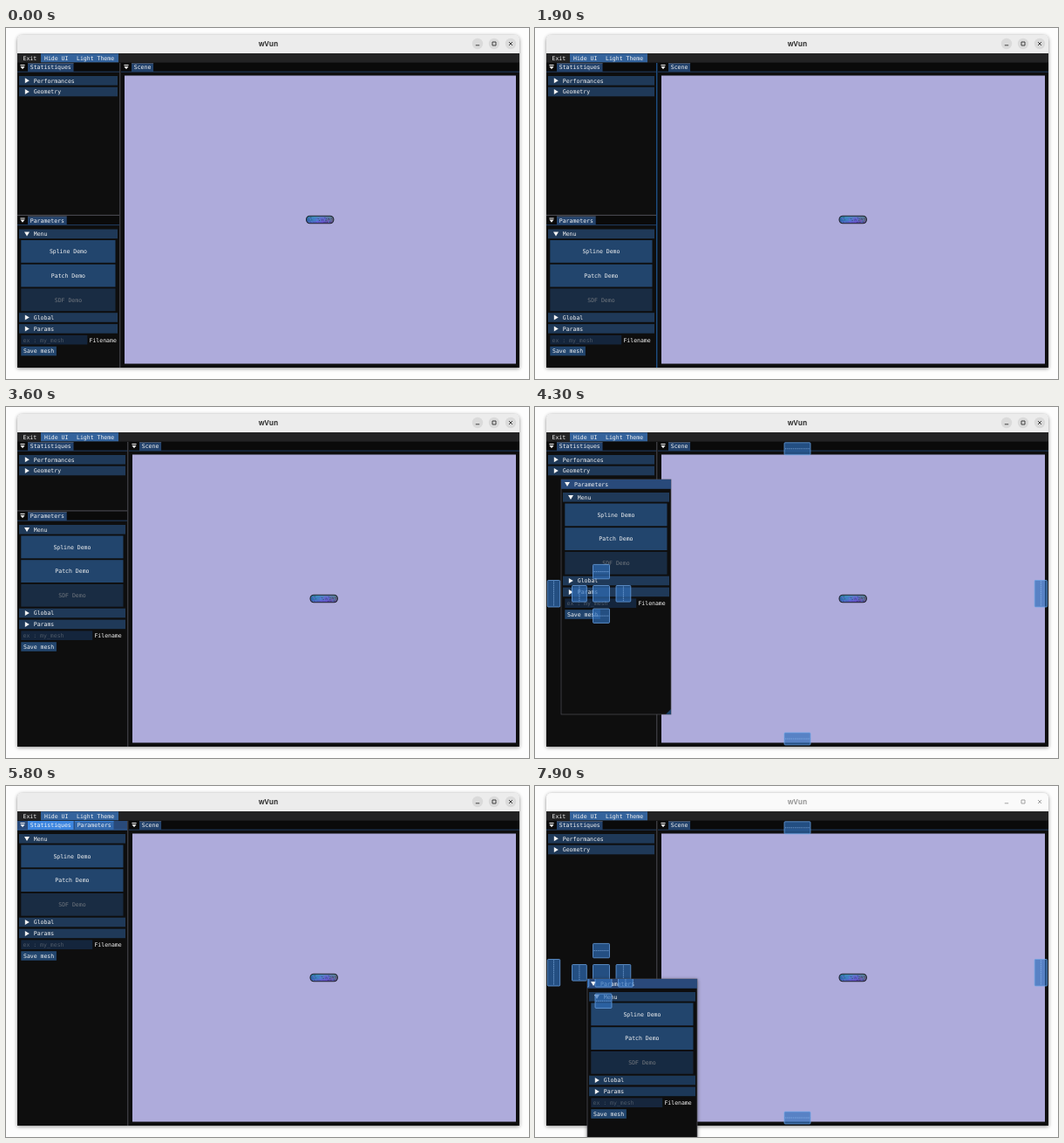
Write an HTML page that moves like this. It is 600x402 px and loops after 8000 ms.

```html
<!DOCTYPE html>
<html lang="en">
<head>
<meta charset="utf-8">
<title>Dockable panels</title>
<style>
  html, body { margin: 0; width: 100%; height: 100%; overflow: hidden; background: #fdfdfd; }
  svg { display: block; width: 600px; height: 402px; }
  text { font: 6.51px "DejaVu Sans Mono", monospace; white-space: pre; }
  .title { font: bold 8px "Noto Sans", "Open Sans", sans-serif; }
</style>
</head>
<body>
<svg id="stage" viewBox="0 0 600 402">
  <defs>
    <filter id="shade" x="-10%" y="-10%" width="120%" height="120%">
      <feDropShadow dx="0" dy="1" stdDeviation="2" flood-color="#000" flood-opacity=".45"/>
    </filter>
    <linearGradient id="hue">
      <stop offset="0" stop-color="#23649c"/>
      <stop offset=".3" stop-color="#3f86c4"/>
      <stop offset=".6" stop-color="#6a62d0"/>
      <stop offset="1" stop-color="#66666c"/>
    </linearGradient>
    <linearGradient id="tilt" x2="0" y2="1">
      <stop offset="0" stop-color="#3cab92" stop-opacity=".55"/>
      <stop offset=".5" stop-color="#5566cc" stop-opacity=".1"/>
      <stop offset="1" stop-color="#6a2ac0" stop-opacity=".65"/>
    </linearGradient>
    <clipPath id="inside"><rect id="hole"/></clipPath>
  </defs>
  <g id="view"></g>
</svg>
<script>
const LOOP = 8000, STEP = 100, CHAR = 3.92;
const LEFT = 13, TOP = 40, RIGHT = 589, BOTTOM = 389;
const C = {
  bg: '#0e0e0e', bar: '#0a0a0a', barOn: '#294a7a', line: '#4d4d55',
  header: '#1f3958', button: '#22456d', off: '#192c43', field: '#14253c',
  tab: '#23426b', tabIdle: '#2d5893', tabOn: '#3369ad', hot: '#4296fa',
  ink: '#f4f4f4', dim: '#70767e', scene: '#aeabdb'
};
const view = document.getElementById('view');
const hole = document.getElementById('hole');

// Smooth curve through [time, value] points, flat at turns and ends.
function track(t, pts) {
  const last = pts.length - 1;
  if (t <= pts[0][0]) return pts[0][1];
  if (t >= pts[last][0]) return pts[last][1];
  const grade = i => (pts[i + 1][1] - pts[i][1]) / (pts[i + 1][0] - pts[i][0]);
  const slope = i => {
    if (i === 0 || i === last) return 0;
    const a = grade(i - 1), b = grade(i);
    return a * b > 0 ? 2 * a * b / (a + b) : 0;
  };
  let i = 0;
  while (t >= pts[i + 1][0]) i++;
  const [t0, a] = pts[i], [t1, b] = pts[i + 1];
  const d = t1 - t0, u = (t - t0) / d, u2 = u * u, u3 = u2 * u;
  return a + (b - a) * (3 * u2 - 2 * u3) + d * (slope(i) * (u3 - 2 * u2 + u) + slope(i + 1) * (u3 - u2));
}

const rect = (x, y, w, h, fill, more = '') =>
  `<rect x="${x}" y="${y}" width="${Math.max(0, w)}" height="${h}" fill="${fill}" ${more}/>`;
const text = (s, x, y, fill = C.ink, more = '') =>
  `<text x="${x}" y="${y + 2.3}" fill="${fill}" ${more}>${s}</text>`;
const path = (d, fill, more = '') => `<path d="${d}" fill="${fill}" ${more}/>`;
const down = (x, y) => path(`M${x - 3} ${y - 2.4}h6l-3 5z`, C.ink);
const right = (x, y) => path(`M${x - 2.2} ${y - 3}v6l5 -3z`, C.ink);

function header(s, x, y, w, open) {
  return rect(x + 2, y, w - 4, 10.6, C.header) +
    (open ? down : right)(x + 11, y + 5.3) + text(s, x + 18.8, y + 5.3);
}

function button(s, x, y, w, h, enabled = true) {
  return rect(x, y, w, h, enabled ? C.button : C.off) +
    text(s, x + w / 2, y + h / 2, enabled ? C.ink : C.dim, 'text-anchor="middle"');
}

function tabBar(x, y, w, tabs, focused) {
  let out = rect(x, y, w, 10, focused ? C.barOn : C.bar) +
    rect(x, y + 9.7, w, .9, focused ? C.tabOn : C.tab) +
    rect(x + 3.4, y + 2, 5.2, 1, C.ink) +
    path(`M${x + 3.4} ${y + 4}h5.2l-2.6 3.2z`, C.ink);
  let tx = x + 12;
  for (const [name, fill] of tabs) {
    const tw = name.length * CHAR + 5.5;
    out += rect(tx, y + .2, tw, 9.8, fill) +
      rect(tx, y, tw, .8, focused ? C.hot : '#66666c', 'opacity=".7"') +
      text(name, tx + 2.8, y + 5);
    tx += tw + 1.3;
  }
  return out;
}

const statsBody = w => header('Performances', LEFT, 55, w) + header('Geometry', LEFT, 67.7, w);

function paramsBody(x, y, w) {
  const bx = x + 4.3, bw = w - 8.8, fw = w * .65;
  return header('Menu', x, y + 15, w, true) +
    button('Spline Demo', bx, y + 27.5, bw, 25.8) +
    button('Patch Demo', bx, y + 55.2, bw, 25.8) +
    button('SDF Demo', bx, y + 82.9, bw, 25.8, false) +
    header('Global', x, y + 110.7, w) +
    header('Params', x, y + 123.6, w) +
    rect(bx, y + 136.4, fw, 10.6, C.field) +
    text('ex : my_mesh', bx + 2.2, y + 141.7, '#4f5a68') +
    text('Filename', bx + fw + 2.2, y + 141.7) +
    button('Save mesh', bx, y + 149.2, 40.6, 10.6);
}

function floating(x, y, w, h) {
  return rect(x, y, w, h, C.bg, `stroke="${C.line}" stroke-width=".7"`) +
    rect(x, y, w, 10.8, C.barOn) + down(x + 7, y + 5.3) + text('Parameters', x + 15, y + 5.3) +
    paramsBody(x, y, w) +
    path(`M${x + w} ${y + h}v-6l-6 6z`, '#1e4268');
}

// One drop target; split says which way its middle line runs.
function target(x, y, w, h, split) {
  const mid = split === 'v' ? `M${x + w / 2} ${y + 1}v${h - 2}` : `M${x + 1} ${y + h / 2}h${w - 2}`;
  return rect(x, y, w, h, '#2f6fba', 'rx="1" fill-opacity=".68" stroke="#6ca5e6" stroke-opacity=".75" stroke-width="1"') +
    (split ? path(mid, 'none', 'stroke="#8fbcf0" stroke-width=".8" stroke-dasharray="1.4 .8" opacity=".8"') : '');
}

const targets =
  target(14.3, 198.5, 14.4, 30.5, 'v') + target(573.2, 198.5, 14.4, 30.5, 'v') +
  target(286, 40.8, 30, 14, 'h') + target(286, 373, 30, 14, 'h') +
  target(66.5, 204.5, 19, 18.6) +
  target(66.5, 180.4, 19, 16.4, 'h') + target(66.5, 231, 19, 16.4, 'h') +
  target(42.5, 204.5, 16.8, 18.6, 'v') + target(93, 204.5, 16.8, 18.6, 'v');

function makePill() {
  const tints = ['#35d0b8', '#4b6cff', '#1b2a60', '#a04af0', '#202026', '#58a0d8'];
  let seed = 7, out = '';
  const rnd = () => (seed = (seed * 16807) % 2147483647) / 2147483647;
  for (let i = 0; i < 60; i++) {
    const x = 26 * rnd() - 13, y = 6 * rnd() - 3;
    out += rect(x.toFixed(1), y.toFixed(1), 1, .8, tints[i % 6], 'opacity=".6"');
  }
  const body = (fill, more) => rect(-15.7, -4.2, 31.4, 8.4, fill, `rx="4.1" ${more || ''}`);
  return body('url(#hue)') + body('url(#tilt)') + out + body('none', 'stroke="#202430" stroke-width="1.1"');
}
const pill = makePill();

function frame(active) {
  const ink = active ? '#333' : '#999';
  let out = path('M13 389V14a6 6 0 0 1 6-6H583a6 6 0 0 1 6 6V389z', active ? '#ececec' : '#fafafa', 'filter="url(#shade)"') +
    `<text class="title" x="301" y="21" text-anchor="middle" fill="${ink}">wVun</text>`;
  if (active) for (const x of [541, 560, 579]) out += `<circle cx="${x}" cy="18" r="6.2" fill="#dadada"/>`;
  return out + path('M538.8 19.8h4.4M558 16h4v4h-4zM577 16l4 4m0-4l-4 4', 'none', `stroke="${ink}" stroke-width=".9"`) +
    rect(LEFT, 29, 576, 360, C.bg) + rect(LEFT, 29, 576, 10.5, '#232324') +
    rect(40, 29.3, 89, 10, '#34639c') +
    text('Exit', 19.5, 34.3) + text('Hide UI', 44, 34.3) + text('Light Theme', 81, 34.3);
}

function draw(t) {
  const split = track(t, [[300, 131], [700, 162], [1000, 220], [1400, 374], [1600, 275], [1800, 148], [1900, 140]]);
  const shelf = track(t, [[2400, 214.5], [3000, 150], [3400, 119]]);
  const w = split - 1 - LEFT;
  const docked = t < 3700, tabbed = t >= 5400 && t < 7500;
  const lifted = !docked && !tabbed, second = t >= 7500;
  const fx = second ? track(t, [[7400, 13], [7500, 17], [7700, 37], [7900, 60]])
                    : track(t, [[3600, 13], [4300, 30], [5300, 24]]);
  const fy = second ? track(t, [[7400, 40], [7500, 47], [7700, 130], [7900, 221]])
                    : track(t, [[3600, 119], [4300, 83], [5300, 41]]);
  const fh = second ? 349 : 269;
  const detached = second && fy + fh > 392;
  const showStats = !tabbed || (t >= 6000 && t < 7200);

  let out = frame(!detached);

  // Left column
  if (tabbed) {
    const hover = (t >= 5600 && t < 6500) ? 0 : (t >= 6700 ? 1 : -1);
    const shade = i => hover === i ? '#3d86e0' : (showStats === (i === 0) ? C.tabOn : C.tabIdle);
    out += tabBar(LEFT, TOP, w, [['Statistiques', shade(0)], ['Parameters', shade(1)]], true);
  } else {
    out += tabBar(LEFT, TOP, w, [['Statistiques', C.tab]]);
  }
  out += showStats ? statsBody(w) : paramsBody(LEFT, TOP, w);
  if (docked) {
    out += rect(LEFT, shelf, w, BOTTOM - shelf, C.bg) +
      tabBar(LEFT, shelf + 1, w, [['Parameters', C.tab]]) +
      paramsBody(LEFT, shelf + 1, w);
    const drag = t >= 2400 && t < 3500;
    out += rect(LEFT, shelf - .6, w, drag ? 1.3 : 1, drag ? C.hot : C.line);
  }

  // Scene
  const sx = split + 5;
  out += rect(split, TOP, RIGHT - split, BOTTOM - TOP, C.bg) +
    tabBar(split + 1, TOP, RIGHT - split - 1, [['Scene', C.tab]]) +
    rect(sx, 54.5, 585 - sx, 330, C.scene) +
    `<g transform="translate(${(sx + 585) / 2 - .3} 219.5)">${pill}</g>`;
  const pull = t >= 300 && t < 1900, near = t >= 1900 && t < 2100;
  out += rect(split - .7, TOP, pull ? 1.5 : 1, BOTTOM - TOP, pull ? C.hot : near ? '#2468b4' : C.line);

  // Dragged panel and drop targets
  if (lifted) {
    const panel = floating(fx, fy, w, fh);
    if (detached) {
      hole.setAttribute('x', fx);
      hole.setAttribute('y', fy);
      hole.setAttribute('width', w);
      hole.setAttribute('height', fh);
      out += targets + `<g filter="url(#shade)">${panel}</g>` +
        `<g clip-path="url(#inside)"><g transform="translate(2.5 7)">${targets}</g></g>`;
    } else {
      out += panel;
      if (t >= 5100 && t < 5400) out += rect(LEFT, TOP, w, BOTTOM - TOP, C.hot, 'opacity=".35"');
      out += targets;
    }
  }
  view.innerHTML = out;
}

let shown = -1;
function tick() {
  const t = Math.floor(performance.now() % LOOP / STEP) * STEP;
  if (t !== shown) draw(shown = t);
  requestAnimationFrame(tick);
}
tick();
</script>
</body>
</html>
```
